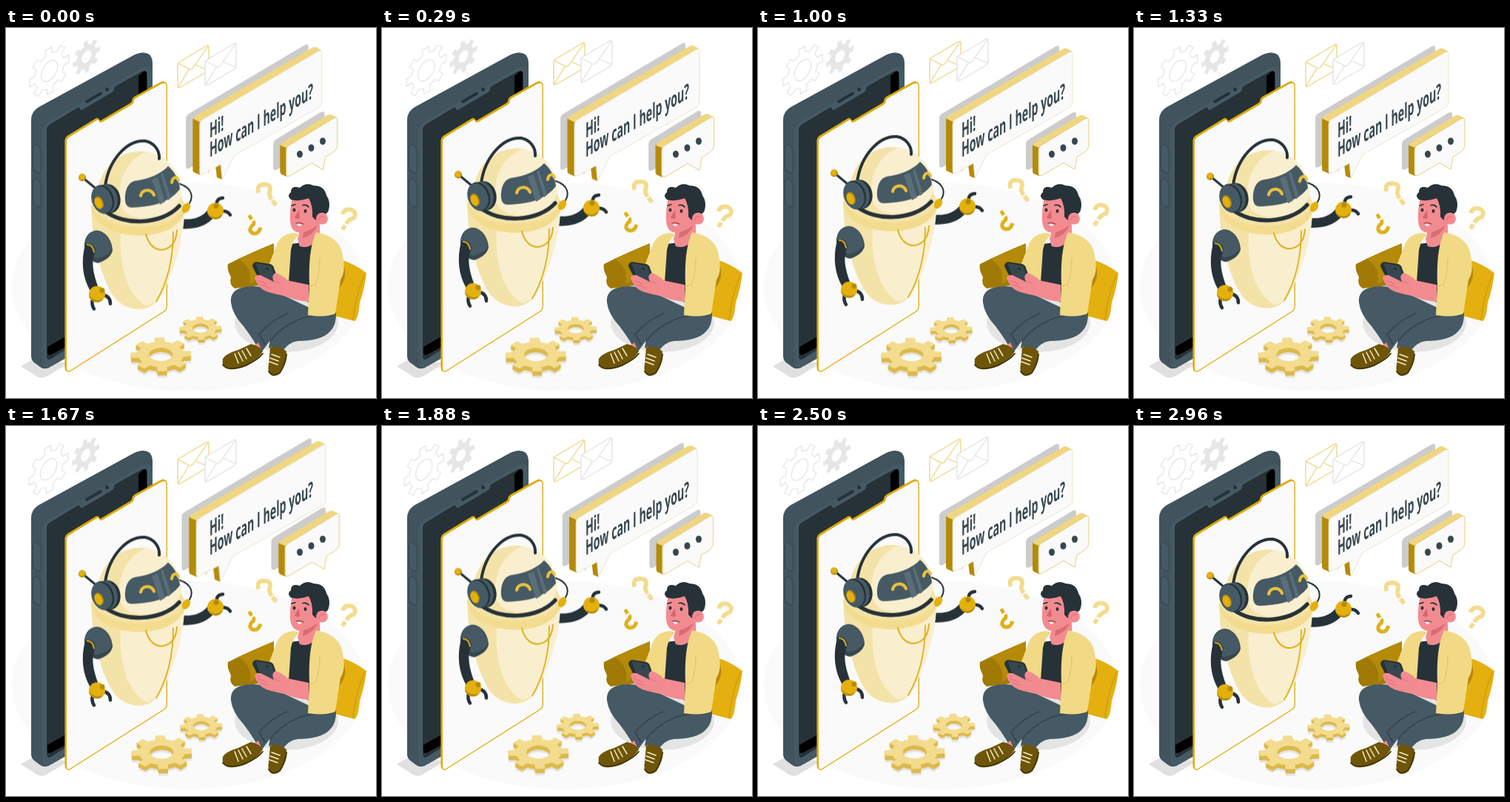
An HTML page that plays this animation: 500x500 px, repeating every 3 s.

```html
<!DOCTYPE html>
<html lang="en">
<head>
<meta charset="utf-8">
<title>Chat bot</title>
<style>
html, body { margin: 0; width: 100%; height: 100%; overflow: hidden; background: #fff; }
svg { display: block; width: 100vw; height: 100vh; }
.float { animation: float 1.5s linear -30ms infinite; }
.sway { transform-origin: 162px 242px; animation: sway 3s linear -30ms infinite; }
.beat { animation: beat 1.5s linear -30ms infinite; }
#big { transform-origin: 335px 112px; }
#small { transform-origin: 404.5px 157px; }
@keyframes float { 50% { transform: translateY(-10px); } }
@keyframes sway { 25% { transform: rotate(1deg); } 75% { transform: rotate(-1deg); } }
@keyframes beat {
  0%, 30%, 40%, 60%, 100% { transform: scale(1); }
  10%, 50% { transform: scale(1.1); }
}
.line { fill: none; stroke-linecap: round; stroke-linejoin: round; }
.ink { fill: #263238; } .slate { fill: #455a64; } .deep { fill: #37474f; }
.gold { fill: #e3b00f; } .brass { fill: #b58a08; } .pale { fill: #f3dc8e; }
.cream { fill: #f4e3a8; } .milk { fill: #f9efcf; } .skin { fill: #f28b90; } .paper { fill: #fafafa; }
.jacket { fill: #f2d985; } .shoe { fill: #6e5508; }
.s-ink { stroke: #263238; } .s-gold { stroke: #dfb01c; } .s-pale { stroke: #f3dc8e; }
text { font: bold 28.5px "Open Sans", "Noto Sans", sans-serif; fill: #37474f; }
</style>
</head>
<body>
<svg viewBox="0 0 500 500">
  <defs>
    <path id="screen" d="M81 154Q81 149 85 146.500L122 124Q125 122 126 125Q127 128 130 126L169 103Q172 101 172 98Q172 96 175 94L209 75Q217 71 217 79V376Q217 380 213 383L87 463Q81 466 81 459Z"/>
    <path id="bigFace" d="M263 130Q263 126 267 123.500L420 33Q425 30 425 35V101Q425 105 421 107.500L309 171L293 203L291 183L267 196Q263 198 263 193Z"/>
    <path id="smallFace" d="M379 165Q379 161 383 158.500L442 122.500Q447 120 447 125V157Q447 164 441 168L431 174L428 191L413 182L384 199Q379 201 379 196Z"/>
  </defs>

  <ellipse class="paper" cx="246.500" cy="350" rx="239" ry="141"/>
  <path fill="#e0e0e0" d="M20 457L38 447L85 453L53 472Q48 474 42 471Z"/>

  <g class="sway" id="backGears"></g>

  <g class="float line" stroke-width="1.200">
    <g id="mail" fill="#fff" stroke="#ecd27a" transform="translate(0 1.500)">
      <path d="M232 48Q232 46 234 45L271 23Q274 21.500 274 25V53Q274 56 272 57.500L235 79Q232 80.500 232 77Z"/>
      <path fill="none" d="M232.500 46.500L247 54Q251 56 253 52L273.500 23M232.500 79L247 55M273.500 56L257 49"/>
    </g>
    <g id="mailGray" fill="#fff" stroke="#e0e0e0" transform="translate(0 .5)">
      <path d="M269 46Q269 44 271 43L308 21Q311 19.500 311 23V51Q311 54 309 55.500L272 77Q269 78.500 269 75Z"/>
      <path fill="none" d="M269.500 44.500L284 52Q288 54 290 50L310.500 21M269.500 77L284 53M310.500 53L294 46"/>
    </g>
  </g>

  <g id="phone">
    <path fill="#41545e" d="M34 124Q34 113 44 107L172 37Q186 30 194 36Q198 40 198 48V380L58 459Q51 462 46 458L38 452Q34 449 34 443Z"/>
    <path class="slate" d="M49 144Q49 132 59 126L181 55Q197 46 198 60V378L60 457Q49 462 49 450Z"/>
    <use href="#screen" class="ink" transform="translate(-26 -16)"/>
    <path d="M179 65L184 60Q190 56 190 63V110H179ZM56 431L82 416V430L62 441Q56 444 56 438Z"/>
    <path class="line s-ink" stroke-width="4" d="M109 99.500L128 88.500"/>
    <circle class="ink" cx="136.500" cy="83" r="2.600"/>
    <g class="slate" stroke="#33434b" stroke-width=".8">
      <path d="M36.500 161Q36.500 157 41 158Q47 161 47 166V192Q47 197 42 195Q36.500 192 36.500 187Z"/>
      <path d="M36.500 207Q36.500 203 41 204Q47 207 47 212V238Q47 243 42 241Q36.500 238 36.500 233Z"/>
    </g>
    <use href="#screen" fill="#e0ab0a" stroke="#e0ab0a" stroke-width="1.600" transform="translate(-.8 -.8)"/>
    <use href="#screen" fill="#fafafa" stroke="#e0ab0a" stroke-width="1.300" transform="translate(.3 .3)"/>
  </g>

  <g class="sway" id="floorGears"></g>

  <g class="float" id="robot">
    <g id="rightArm">
      <path class="line s-ink" stroke-width="13" d="M238 265Q264 267 277 251"/>
      <path class="line s-ink" stroke-width="4.500" d="M285 241Q283 231 293 230M291 248Q299 247 303 253"/>
      <circle class="gold" cx="283" cy="247.500" r="11"/>
      <path class="brass" d="M273 252Q284 261 293 251Q291 259 283 259Q276 258 273 252Z"/>
      <circle class="brass" cx="284" cy="241" r="3.500"/>
    </g>
    <path class="cream" d="M116 236C113 280 128 338 146 364Q160 381 182 380.500Q203 379 213 355C228 325 240 285 241 245Z"/>
    <path class="milk" d="M155 278C152 325 166 364 190 376Q206 372 213 355C228 325 239 288 241 255Z"/>
    <path class="line s-gold" stroke-width="1.800" d="M226 276C226 316 216 348 203 370"/>
    <path class="pale" d="M115 240C115 262 140 280 178 281C212 281 240 268 242 244Z"/>
    <path class="line s-gold" stroke-width="2" d="M189 279C193 295 203 301 212 300C224 298 230 288 231 274"/>
    <path class="cream" d="M115 234C116 254 142 269 178 269C214 269 240 255 241 238L232 218L130 216Z"/>

    <path class="cream" d="M123 224C127 191 150 167 182 167C214 168 236 192 237 222C236 245 212 259 180 260C148 260 123 246 123 224Z"/>
    <path class="milk" d="M155 240C148 210 162 178 190 168C217 171 236 195 237 222C236 240 221 252 201 256C178 260 160 255 155 240Z"/>
    <path class="line s-ink" stroke-width="5.500" d="M133 247C158 268 210 267 234 241"/>
    <path class="slate" d="M161 234C160 220 165 209 174 207C194 204 209 198 219 187C229 195 234 207 235 218C222 235 201 242 170 243Q162 243 161 234Z"/>
    <path fill="#5b6e78" d="M197 205L205 202L215 235L208 239ZM209 199L212 196L223 230L219 233Z"/>
    <path class="line" stroke="#e9c13d" stroke-width="4.200" d="M182 227C184 218 196 217 200 226M224 209C225 202 231 200 233 206"/>

    <path class="line s-ink" stroke-width="4" d="M134 214C139 178 164 151 188 153C200 155 208 166 207 177"/>
    <path class="line s-ink" stroke-width="2" d="M235 211C252 217 255 230 245 241"/>
    <ellipse class="gold" cx="243.500" cy="243.500" rx="5" ry="7.500" transform="rotate(30 243.500 243.500)"/>
    <path class="line s-ink" stroke-width="3" d="M103 202L121 217"/>
    <circle class="brass" cx="103" cy="202.500" r="5"/>
    <circle class="gold" cx="102.500" cy="201.500" r="4"/>
    <ellipse class="ink" cx="139" cy="231" rx="15.500" ry="20" transform="rotate(-12 139 231)"/>
    <ellipse class="slate" cx="136" cy="231" rx="14.500" ry="19.500" transform="rotate(-14 136 231)"/>
    <ellipse class="ink" cx="131" cy="232" rx="14.500" ry="20" transform="rotate(-18 131 232)"/>
    <ellipse class="slate" cx="129.500" cy="232.500" rx="13.500" ry="19" transform="rotate(-20 129.500 232.500)"/>
    <ellipse class="brass" cx="125.500" cy="236.500" rx="6" ry="9" transform="rotate(-22 125.500 236.500)"/>
    <ellipse class="gold" cx="125" cy="237" rx="4.700" ry="7.500" transform="rotate(-22 125 237)"/>

    <path class="deep" d="M106 292C107 280 115 274 123 274C134 275 143 286 144 301Q141 313 124 318Q106 314 106 292Z"/>
    <path class="slate" d="M107 290C109 280 116 275 123 275C133 276 142 286 143 300Q138 309 122 312Q108 306 107 290Z"/>
    <path class="ink" d="M107 293Q113 289 119 296Q122 302 119 307Q114 322 124 349L114 356Q98 328 107 293Z"/>
    <path class="line s-gold" stroke-width="2" d="M110 293Q117 293 119 303"/>
    <path class="line s-ink" stroke-width="4.500" d="M117 367Q115 374 119 380M131 361Q141 363 141 373"/>
    <circle class="gold" cx="123" cy="360" r="11"/>
    <path class="brass" d="M112 361Q118 371 131 367Q126 373 119 370Q112 367 112 361Z"/>
    <circle class="brass" cx="130" cy="355" r="3.500"/>
  </g>

  <g class="beat" id="big">
    <use href="#bigFace" fill="#ccc" transform="translate(-18 -8)"/>
    <path class="brass" d="M254 123Q254 121 258 121L264 126V197L257 194Q254 193 254 190ZM284 184L292 180L293 203L286 200Z"/>
    <path fill="#f0d680" d="M254.500 122.500Q255 120 258 118L412 28.500Q415 26.500 418 28L424.500 31.500L264 127Z"/>
    <use href="#bigFace" class="paper" stroke="#e6dcb8" stroke-width=".7"/>
  </g>
  <g class="beat" id="small">
    <use href="#smallFace" fill="#ccc" transform="translate(-17 -8)"/>
    <path class="brass" d="M371 159Q371 157 375 156L380 161V200L373 197Q371 196 371 193Z"/>
    <path fill="#f0d680" d="M371.500 158.500Q372 156 375 154L434 118.500Q437 117 439 118L446 121.500L380 162Z"/>
    <use href="#smallFace" class="paper" stroke="#e2c35c" stroke-width=".8"/>
  </g>
  <g transform="matrix(.498 -.287 0 1 275 149)">
    <text>Hi!</text>
    <text y="26">How can I help you?</text>
  </g>
  <g class="deep">
    <ellipse cx="397" cy="170.500" rx="4" ry="4.800"/>
    <ellipse cx="412.500" cy="162" rx="4" ry="4.800"/>
    <ellipse cx="428" cy="153" rx="4" ry="4.800"/>
  </g>

  <g id="man">
    <ellipse fill="#e4e4e4" cx="379" cy="398" rx="70" ry="40"/>
    <path fill="#a17a06" d="M300 319Q332 303 362 291Q361 305 367 345L309 352Q301 347 304 337Q298 325 300 319Z"/>
    <path class="brass" d="M314 312Q340 301 362 291Q361 305 364 320L330 346Q333 322 314 312Z"/>
    <path class="gold" d="M452 313Q470 318 487 331Q485 350 478 371Q476 393 471 396Q455 392 434 386Z"/>
    <path class="brass" d="M453 313Q459 320 458 336Q456 345 450 352Z"/>
    <path class="line" stroke="#c4960a" d="M484 334Q472 362 469 394"/>

    <path class="slate" d="M304 371Q302 354 322 350Q345 346 368 358L410 378L446 384Q447 402 437 411Q425 423 394 423Q380 425 373 439L355 432L357 422L344 440Q337 424 321 403Q306 387 304 371Z"/>
    <path class="line" stroke="#34454e" stroke-width="1.500" d="M342 414Q358 395 380 386M357 424Q368 406 398 393Q420 387 440 389M342 414L350 427"/>
    <path class="skin" d="M333 431L341 425L346 437L340 442Z"/>
    <path class="skin" d="M357 431L371 434L368 442L358 440Z"/>

    <path class="shoe" d="M293 447Q297 440 314 435L331 427Q344 430 347 437Q341 448 325 455Q311 462 301 461Q291 458 293 447Z"/>
    <path class="line" stroke="#443607" stroke-width="2" d="M293 455Q300 465 324 456Q341 448 347 440"/>
    <path class="shoe" d="M357 432Q368 428 379 437Q379 450 373 462Q367 471 358 469Q353 464 355 454Z"/>
    <path class="line" stroke="#443607" stroke-width="2" d="M355 464Q361 473 370 466Q378 454 379 441"/>
    <path class="line" stroke="#f7ecc4" stroke-width="1.500" d="M309 440L314 453M314 438L320 450M319 436L325 447M325 433L331 443M357 446L368 450M356 451L367 455M359 441L370 445"/>

    <path class="ink" d="M384 292L414 288L413 374L381 350Z"/>
    <path class="skin" d="M399 268L424 262V279Q414 300 397 295L394 285Z"/>
    <path class="jacket" d="M391 277Q371 277 365 295L351 331L370 338L382 344L385 300Q387 288 396 279Z"/>
    <path class="jacket" d="M419 276Q446 281 453 299Q461 327 452 340L445 386Q431 392 408 388L410 347Q408 300 419 276Z"/>
    <path class="line" stroke="#dfc267" stroke-width="1" d="M424 311Q424 332 418 347L409 349"/>

    <path class="skin" d="M409 347V370Q388 368 372 360Q360 357 350 352L360 338Q372 336 380 341Z"/>
    <path class="ink" d="M333 322Q333 317 338 316L357 319Q361 320 362 324L369 344Q369 348 365 350L352 352Q348 352 346 348Z"/>
    <path class="deep" d="M337 318L357 321Q359 322 360 325L366 344L349 348Z"/>
    <circle class="ink" cx="353" cy="325" r="2"/>
    <path class="skin" d="M336 337Q340 331 348 336L362 343Q358 334 364 331Q374 334 382 342L396 347L382 363Q364 360 352 356Q339 351 336 337Z"/>
    <path class="line" stroke="#d86c73" stroke-width=".8" d="M341 341L352 346M344 347L356 351M363 342L371 345"/>

    <path class="skin" d="M387 228Q383 248 384 261Q385 275 397 277Q406 277 415 272L427 262L430 230Z"/>
    <path fill="#d96d74" d="M402 276Q413 273 421 266Q416 279 401 284Z"/>
    <path class="ink" d="M385 232Q379 226 385 222Q385 212 397 216Q405 208 416 213Q430 213 433 226Q439 235 436 246Q434 253 428 251Q421 250 419 260L414 255Q415 240 409 230Q396 235 385 232Z"/>
    <circle class="skin" cx="427" cy="257.500" r="8"/>
    <path class="line" stroke="#d96d74" d="M423 260Q424 253 430 255"/>
    <path fill="#d2666d" d="M396 246L390 256Q392 259 397 257Z"/>
    <g class="ink"><ellipse cx="389.500" cy="246" rx="1.900" ry="2.400"/><ellipse cx="404.500" cy="247.500" rx="1.900" ry="2.400"/></g>
    <path class="line s-ink" stroke-width="1.600" d="M386 240L391 238.500M401 239.500Q406 238 409 242"/>
    <path class="line" stroke="#9d3f48" stroke-width="1.300" d="M392 264Q397 262 402 265"/>
    <path fill="#fff" d="M393 265Q397 264 400 266L396 268Z"/>
  </g>

  <g class="float" fill="none" stroke-width="5.800">
    <path class="s-pale" d="M341.500 223Q338 213 347 212Q358 211 357 219Q354 226 359 232M360 233.500L365 240"/>
    <path class="s-pale" d="M454.500 252Q458 243.500 467 246Q475 250 470 257Q463 259 460 265M458.500 267L454.500 273"/>
    <path class="s-gold" stroke-width="5" d="M328.500 253.500L332 259M334 261Q337 265 332 268Q327 274 333 277.500Q341 280 344 270"/>
  </g>
</svg>
<script>
const NS = "http://www.w3.org/2000/svg";

// Toothed ring centred on the origin: tip radius, root radius, hole radius.
function gear(tip, root, hole, teeth = 8) {
  const step = 2 * Math.PI / teeth;
  const at = (r, a) => (r * Math.cos(a)).toFixed(2) + " " + (r * Math.sin(a)).toFixed(2);
  let d = "";
  for (let i = 0; i < teeth; i++) {
    const a = i * step - .05;
    d += (i ? `A${root} ${root} 0 0 1 ` : "M") + at(root, a - step * .28);
    d += "L" + at(tip, a - step * .2) + "L" + at(tip, a + step * .2) + "L" + at(root, a + step * .28);
  }
  return d + `ZM${hole} 0A${hole} ${hole} 0 1 0 ${-hole} 0A${hole} ${hole} 0 1 0 ${hole} 0Z`;
}

function add(parent, d, transform, fill, stroke = "none") {
  const p = document.createElementNS(NS, "path");
  const attrs = { d, transform, fill, stroke, "fill-rule": "evenodd", "vector-effect": "non-scaling-stroke" };
  for (const k in attrs) p.setAttribute(k, attrs[k]);
  document.getElementById(parent).append(p);
}

const wall = (x, y) => `matrix(.866 -.5 0 1 ${x} ${y})`;
add("backGears", gear(31, 23, 13), wall(58.5, 58), "#fff", "#dedede");
add("backGears", gear(21.5, 15.5, 7.5), wall(108.5, 39), "#e6e6e6");

function floorGear(x, y, tip, root, hole, depth) {
  const d = gear(tip, root, hole);
  const lay = (dy, fill) => add("floorGears", d, `translate(${x} ${y + dy}) scale(1 .56)`, fill);
  lay(depth + 3, "#e4e4e4");
  for (let dy = depth; dy > 0; dy--) lay(dy, "#dcb94c");
  lay(0, "#f3dc8e");
}
floorGear(209.5, 441, 41, 31, 16, 6);
floorGear(263, 405.5, 28.5, 21.5, 11, 4);
</script>
</body>
</html>
```
